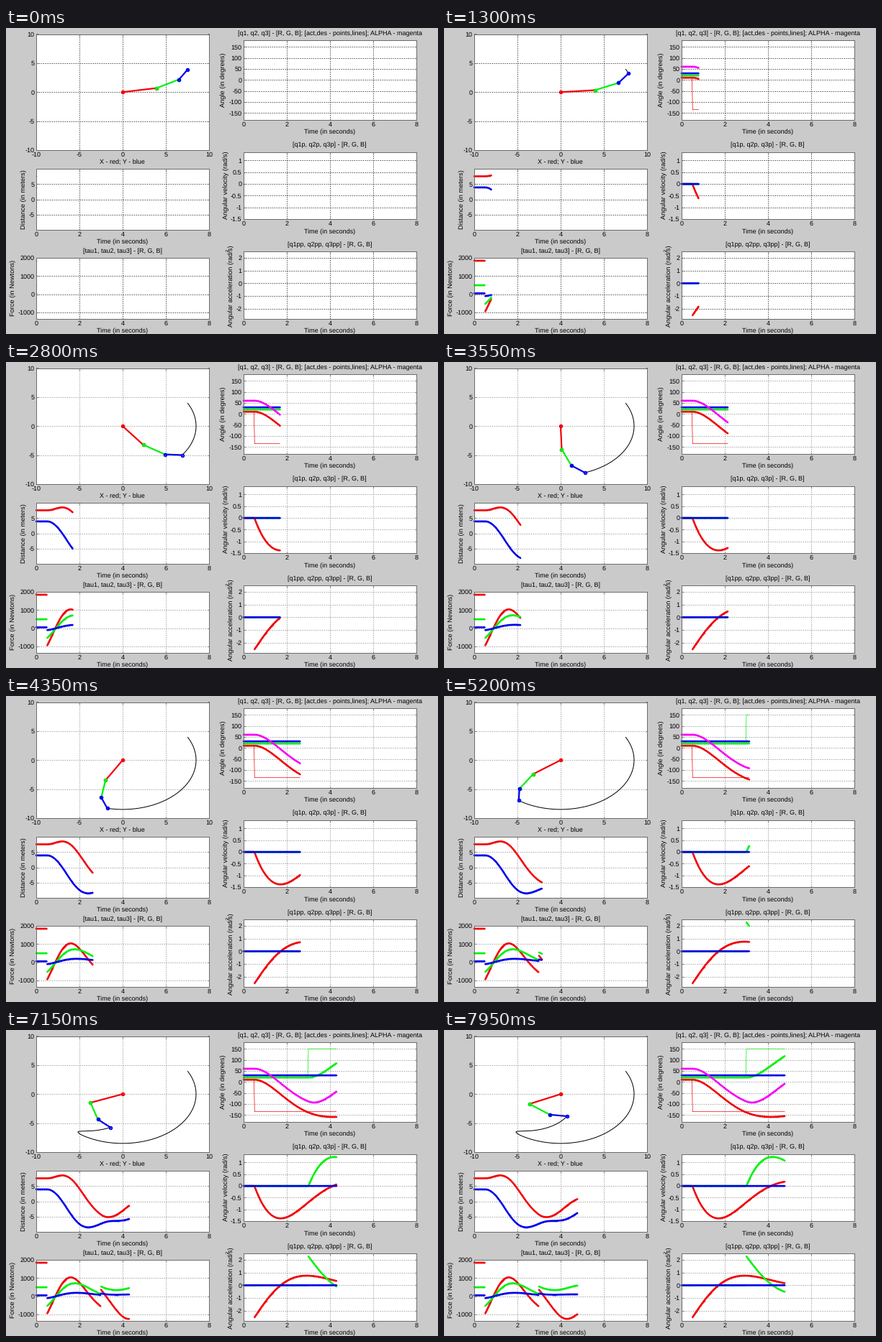
A matplotlib script for the animation above (8 s loop, 600 px wide and 426 px high).

```python
import numpy as np
import matplotlib.pyplot as plt
from matplotlib.animation import FuncAnimation

W, H, DPI = 600, 426, 64
PX = 72 / DPI                      # points per pixel
FRAMES, STEP = 160, 50
DT = 0.03
RED, GREEN, BLUE, MAGENTA = "#f20006", "#00f20c", "#0000ea", "#f800f8"
RGB = (RED, GREEN, BLUE)

plt.rcParams.update({"font.family": "Liberation Sans", "font.size": 9 * PX,
                     "text.hinting": "none", "lines.scale_dashes": False,
                     "axes.linewidth": PX, "axes.edgecolor": "#6c6c6c"})

# ---- three-link arm: second-order joint control and inverse dynamics ----
LENGTH, MASS, FRICTION = (4, 3, 2), (20, 15, 10), (200, 150, 100)
START = (10, 20, 30)
GOAL = (-135, 150, 30)
SWITCH = (0.5, 3.0, 99)
GRAVITY = 9.81


def joint(t, start, goal, t0):
    """Step response of q'' = (goal - q) - q', in radians."""
    s = np.clip(t - t0, 0, None)
    on = t > t0 - 1e-9
    gap, wd = np.radians(goal - start), np.sqrt(3) / 2
    decay, c, n = np.exp(-s / 2), np.cos(wd * s), np.sin(wd * s) / np.sqrt(3)
    q = np.radians(start) + gap * (1 - decay * (c + n))
    qp = gap * decay * n * 2
    qpp = gap * decay * (c - n) * on
    return q, qp, qpp, np.where(on, goal, start)


t = np.arange(FRAMES) * DT
q, qp, qpp, goal = map(np.array, zip(*(joint(t, *a) for a in zip(START, GOAL, SWITCH))))
angle, omega, alpha = (np.cumsum(v, axis=0) for v in (q, qp, qpp))

# positions and accelerations in the complex plane
joints = [np.zeros(FRAMES, complex)]
centres, forces = [], []
acc = np.zeros(FRAMES, complex)
for i in range(3):
    link = LENGTH[i] * np.exp(1j * angle[i])
    link_acc = link * (1j * alpha[i] - omega[i] ** 2)
    centres.append(joints[-1] + link / 2)
    forces.append(MASS[i] * (acc + link_acc / 2 + 1j * GRAVITY))
    joints.append(joints[-1] + link)
    acc = acc + link_acc
tip = joints[-1]
torque = [sum((np.conj(centres[i] - joints[j]) * forces[i]).imag for i in range(j, 3))
          + FRICTION[j] * qp[j] for j in range(3)]

# ---- stage ----
fig = plt.figure(figsize=(W / DPI, H / DPI), dpi=DPI, facecolor="#cbcacb")
grid = []


def label(x, y, text, rotation=0, size=9):
    fig.text(x / W, 1 - y / H, text, ha="center", va="center",
             rotation=rotation, fontsize=size * PX)


def panel(x, top, bottom, xlim, ylim, xticks, yticks):
    ax = fig.add_axes([x / W, 1 - bottom / H, 240 / W, (bottom - top) / H])
    ax.set(xlim=xlim, ylim=ylim)
    ax.set_xticks(xticks, [f"{v:g}" for v in xticks])
    ax.set_yticks(yticks, [f"{v:g}" for v in yticks])
    ax.tick_params(direction="in", length=2.5 * PX, width=0.8 * PX, pad=2.5 * PX,
                   color="#6c6c6c", top=True, right=True)
    dash = dict(lw=0.9 * PX, ls=(0, (1.6 * PX, 1.4 * PX)), zorder=0.5)
    grid.extend(ax.axvline(v, **dash) for v in xticks if xlim[0] < v < xlim[1])
    grid.extend(ax.axhline(v, **dash) for v in yticks if ylim[0] < v < ylim[1])
    return ax


def time_panel(x, top, bottom, ylim, yticks, xlabel_y):
    label(x + 120, xlabel_y, "Time (in seconds)")
    return panel(x, top, bottom, (0, 8), ylim, range(0, 9, 2), yticks)


arm_ax = panel(42, 8.5, 170, (-10, 10), (-10, 10), range(-10, 11, 5), range(-10, 11, 5))
dist_ax = time_panel(42, 196, 281, (-10, 10), (-5, 0, 5), 298)
force_ax = time_panel(42, 319.5, 405, (-1360, 2020), range(-1000, 2001, 1000), 422)
angle_ax = time_panel(330, 17, 127.5, (-180, 180), range(-150, 151, 50), 145)
vel_ax = time_panel(330, 173, 266, (-1.5, 1.35), np.arange(-1.5, 1.1, 0.5), 284)
acc_ax = time_panel(330, 311, 405, (-2.8, 2.5), range(-2, 3), 422)

label(161.5, 187, "X - red; Y - blue")
label(162, 310.5, "[tau1, tau2, tau3] - [R, G, B]")
label(449.5, 7.5, "[q1, q2, q3] - [R, G, B]; [act,des - points,lines]; ALPHA - magenta")
label(449.5, 163, "[q1p, q2p, q3p] - [R, G, B]")
label(449.5, 302, "[q1pp, q2pp, q3pp] - [R, G, B]")
label(25, 239, "Distance (in meters)", 90, 9.2)
label(9.5, 362, "Force (in Newtons)", 90, 9.2)
label(302, 72, "Angle (in degrees)", 90, 9.2)
label(305.5, 219, "Angular velocity (rad/s)", 90, 9.2)
label(312.5, 359.5, "Angular acceleration (rad/s)", 90, 9.2)
label(308, 309, "2", 90, 6)

# ---- moving parts ----
trails = []
phases = np.split(np.arange(FRAMES), np.searchsorted(t, np.array(SWITCH[:2]) - 1e-9))


def trail(ax, x, y, color, width, **style):
    line, = ax.plot([], [], color=color, lw=width * PX, snap=False, **style)
    trails.append((line, np.arange(FRAMES)[:len(x)], x, y))
    return line


def curve(ax, y, color):
    """Thick trace that breaks wherever a joint gets a new goal."""
    for part in phases:
        line = trail(ax, t[part], y[part], color, 2.5, marker="o", ms=1.6 * PX,
                     mew=0, solid_capstyle="round", clip_on=False)
        trails[-1] = (line, part, t[part], y[part])


trail(arm_ax, tip.real, tip.imag, "black", 1)
for y, color in ((tip.real, RED), (tip.imag, BLUE)):
    curve(dist_ax, y, color)
for k, color in enumerate(RGB):
    trail(angle_ax, t, goal[k], color, 0.7)
for k, color in enumerate(RGB):
    curve(angle_ax, np.degrees(q[k]), color)
    curve(vel_ax, qp[k], color)
    curve(acc_ax, qpp[k], color)
    curve(force_ax, torque[k], color)
curve(angle_ax, np.degrees(angle[2]), MAGENTA)

links = [arm_ax.plot([], [], "o-", color=c, lw=2.2 * PX, ms=3.6 * PX,
                     mfc="none", mew=1.9 * PX)[0] for c in RGB]


def update(n):
    for line, index, x, y in trails:
        shown = index <= n
        line.set_data(x[shown], y[shown])
    for k, line in enumerate(links):
        ends = np.array([joints[k][n], joints[k + 1][n]])
        line.set_data(ends.real, ends.imag)
    # the grid turns lighter partway through
    shade = "#4c4c4c" if n < 50 else "#a4a4a4"
    for line in grid:
        line.set_color(shade)


anim = FuncAnimation(fig, update, frames=FRAMES, interval=STEP,
                     init_func=lambda: update(0), repeat=True, repeat_delay=0)
plt.show()
```
